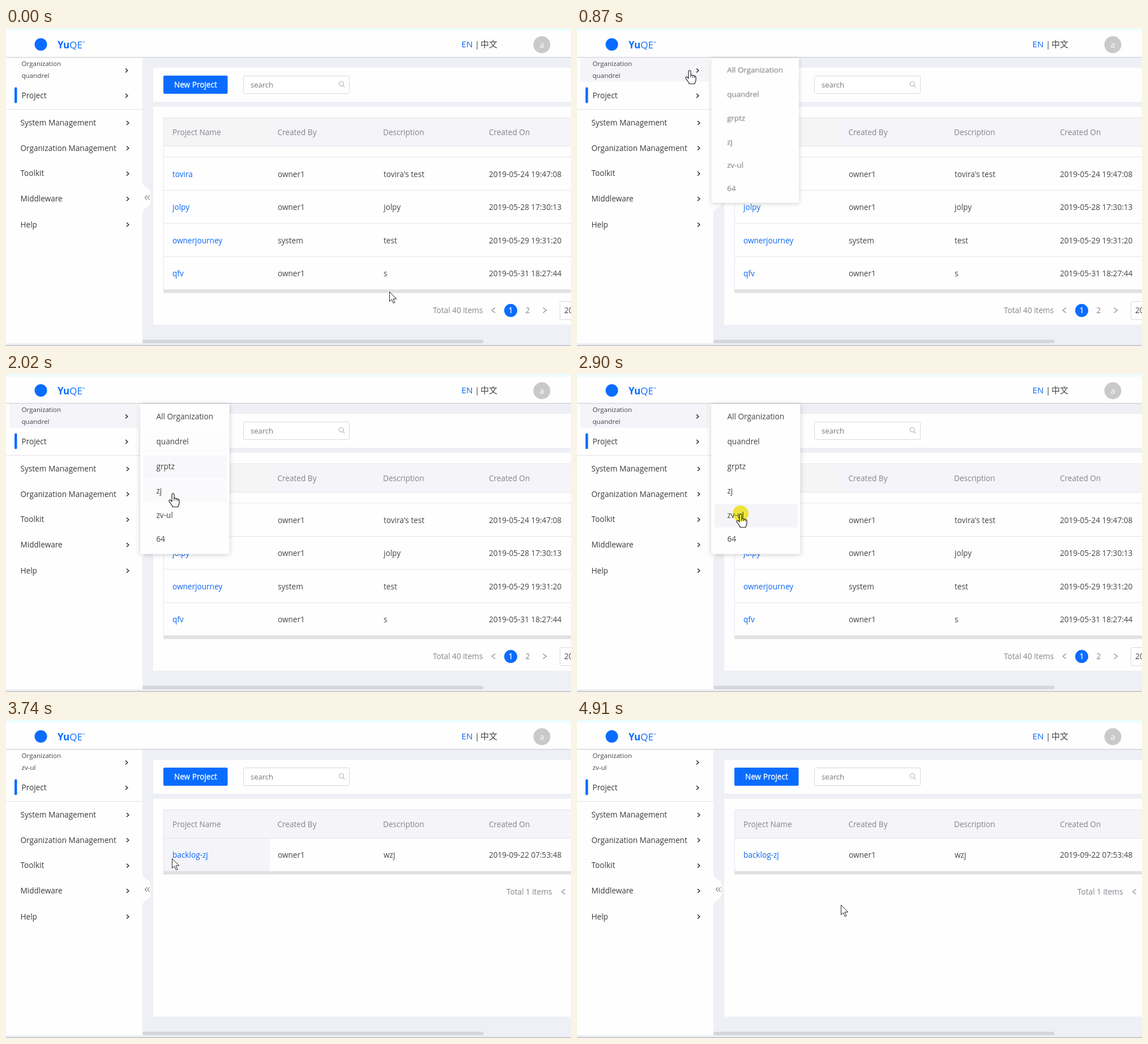
Animation of 998x561 px, one loop 4.98 s. Source, as an HTML page:

```html
<!DOCTYPE html>
<html lang="en">
<head>
<meta charset="utf-8">
<title>Project list</title>
<style>
html, body { margin: 0; width: 100%; height: 100%; overflow: hidden; background: #fefefe; }
svg { display: block; width: 998px; height: 561px; font: 13.6px "Open Sans", "Noto Sans", sans-serif; fill: #444; }
.small { font-size: 11.6px; }
.head { fill: #83838c; }
.link { fill: #0a66f5; }
.blue { fill: #0a6cff; }
.panel { fill: #fefefe; }
.shade { fill: #f4f4f9; }
.page { fill: #eff0f5; }
.bar { fill: #d5d6da; }
.line { fill: none; stroke: #e5e5ea; }
.icon { fill: none; stroke: #8a8a92; stroke-width: 1.2; }
.faint { stroke: #b0b0b6; }
.side { fill: none; stroke: #2a2a2a; stroke-width: 1.5; }

/* one loop for every part */
.anim { animation: 4980ms linear infinite; }
.before { animation-name: before; animation-timing-function: step-end; }
.loading { animation-name: loading; animation-timing-function: step-end; opacity: 0; }
.after { animation-name: after; animation-timing-function: step-end; opacity: 0; }
.loaded { animation-name: loaded; animation-timing-function: step-end; opacity: 0; }
.pointing { animation-name: pointing; animation-timing-function: step-end; opacity: 0; }
.idle { animation-name: idle; animation-timing-function: step-end; }
.click { animation-name: click; animation-timing-function: step-end; opacity: 0; mix-blend-mode: multiply; }
.cursor { animation-name: move; }
.menu { animation-name: menu; animation-timing-function: step-end; opacity: 0;
  transform-origin: 237px 53px; filter: drop-shadow(0 1px 4px rgba(0,0,0,.2)); }
.items { animation-name: items; animation-timing-function: step-end; }
.pass { animation-name: pass; opacity: 0; }
.stay { animation-name: stay; opacity: 0; }
.cell { animation-name: cell; }
.row { animation-name: row; }
.spin { animation-name: spin; transform-origin: 743px 347.5px; }

@keyframes before { 0% { opacity: 1 } 64.257%, 100% { opacity: 0 } }
@keyframes loading { 0% { opacity: 0 } 64.257% { opacity: 1 } 70.683%, 100% { opacity: 0 } }
@keyframes after { 0% { opacity: 0 } 64.257%, 100% { opacity: 1 } }
@keyframes loaded { 0% { opacity: 0 } 70.683%, 100% { opacity: 1 } }
@keyframes pointing { 0% { opacity: 0 } 12.65% { opacity: 1 } 64.257%, 100% { opacity: 0 } }
@keyframes idle { 0% { opacity: 1 } 12.65% { opacity: 0 } 64.257%, 100% { opacity: 1 } }
@keyframes click { 0% { opacity: 0 } 58.23% { opacity: 1 } 61.044%, 100% { opacity: 0 } }
@keyframes menu {
  0% { opacity: 0; transform: scale(.9, .8) }
  14.25% { opacity: .4; transform: scale(.9, .8) }
  15.86% { opacity: .9; transform: scale(.95, .92) }
  17.46% { opacity: 1; transform: scale(.985, .966) }
  19.07% { opacity: 1; transform: scale(.995, .99) }
  20.48% { opacity: 1; transform: none }
  62.65% { opacity: .5; transform: scale(.95, .9) }
  64.257%, 100% { opacity: 0; transform: scale(.9, .8) }
}
@keyframes items { 0% { opacity: .4 } 17.46% { opacity: .75 } 19.07% { opacity: .9 } 20.48%, 100% { opacity: 1 } }
@keyframes pass { 0% { opacity: 0 } 3% { opacity: .8 } 8%, 100% { opacity: 0 } }
@keyframes stay { 0%, 43.5% { opacity: 0 } 46.9%, 100% { opacity: 1 } }
@keyframes cell { 0%, 82.1% { opacity: 1 } 84.9%, 100% { opacity: 0 } }
@keyframes row { 0%, 75.2% { opacity: 0 } 78.3%, 82.1% { opacity: 1 } 84.9%, 100% { opacity: 0 } }
@keyframes spin {
  0%, 64.257% { transform: rotate(-44deg); animation-timing-function: steps(4) }
  70.683%, 100% { transform: rotate(52deg) }
}
@keyframes move {
  0%, 1.606% { transform: translate(677px, 465px); animation-timing-function: steps(2, start) }
  4.82% { transform: translate(605px, 411px); animation-timing-function: steps(3, start) }
  9.44% { transform: translate(305px, 184px); animation-timing-function: steps(2, start) }
  12.651% { transform: translate(239px, 134px); animation-timing-function: steps(2, start) }
  15.863%, 26.908% { transform: translate(199px, 75px); animation-timing-function: steps(3, start) }
  31.526% { transform: translate(262px, 84px); animation-timing-function: steps(4, start) }
  37.751% { transform: translate(314px, 164px); animation-timing-function: steps(3, start) }
  41.867% { transform: translate(295px, 211px); animation-timing-function: steps(4, start) }
  48.594%, 64.25% { transform: translate(289px, 247px); animation-timing-function: step-start }
  64.257%, 75.1% { transform: translate(290px, 246px); animation-timing-function: step-start }
  76.707% { transform: translate(293px, 244px); animation-timing-function: steps(6, start) }
  86.145% { transform: translate(415px, 287px); animation-timing-function: steps(3, start) }
  90.964%, 98.594% { transform: translate(431px, 311px); animation-timing-function: step-start }
  100% { transform: translate(466px, 326px) }
}
</style>
</head>
<body>
<svg viewBox="0 0 998 561">
  <defs>
    <path id="chev" d="M-2-3.5 1.8 0-2 3.5"/>
    <path id="next" d="M-3-4.5 3 0-3 4.5"/>
    <linearGradient id="fall" x2="0" y2="1">
      <stop stop-color="#cdced2"/><stop offset="1" stop-color="#cdced2" stop-opacity="0"/>
    </linearGradient>
  </defs>

  <!-- page -->
  <rect class="panel" width="998" height="561"/>
  <rect class="page" x="241" y="51" width="757" height="506"/>
  <rect class="panel" x="260" y="70" width="738" height="60"/>
  <rect class="panel" x="260" y="139" width="738" height="384.5"/>
  <rect class="page" y="556" width="998" height="5"/>
  <rect class="bar" x="241" y="550" width="602" height="6" rx="2"/>
  <rect y="559.5" width="998" height="1.5" fill="#c0c1c6"/>

  <!-- toolbar -->
  <rect class="blue" x="278" y="84" width="113.5" height="32" rx="2"/>
  <text x="297" y="105" fill="#fff" stroke="#fff" stroke-width=".3">New Project</text>
  <rect x="419.5" y="84.5" width="187" height="31" rx="2" fill="#fff" stroke="#d9d9de"/>
  <text x="432" y="105" fill="#777" font-size="13">search</text>
  <path class="icon faint" d="M595.5 102l2.5 2.5M596.2 98.4a3.9 3.9 0 1 1-7.8 0a3.9 3.9 0 1 1 7.8 0"/>

  <!-- table shown at first -->
  <g class="anim before">
    <rect class="shade" x="279" y="158" width="719" height="50"/>
    <rect x="279" y="159" width="185" height="49" fill="#f5f5f6"/>
    <path class="line" d="M998 158.5H278.5V462M279 208.5H998M279 227.5H998M279 286.5H998M279 344.5H998M279 403.5H998M279 461.5H998"/>
    <rect x="278" y="462" width="720" height="5.5" fill="#e1e1e3"/>
    <text class="head" y="189"><tspan x="294">Project Name</tspan><tspan x="479.5">Created By</tspan><tspan x="666">Description</tspan><tspan x="853">Created On</tspan></text>
    <text y="263"><tspan class="link" x="294">tovira</tspan><tspan x="480">owner1</tspan><tspan x="667">tovira's test</tspan><tspan x="853">2019-05-24 19:47:08</tspan></text>
    <text y="321"><tspan class="link" x="294">jolpy</tspan><tspan x="480">owner1</tspan><tspan x="667">jolpy</tspan><tspan x="853">2019-05-28 17:30:13</tspan></text>
    <text y="380"><tspan class="link" x="294">ownerjourney</tspan><tspan x="480">system</tspan><tspan x="667">test</tspan><tspan x="853">2019-05-29 19:31:20</tspan></text>
    <text y="438"><tspan class="link" x="294">qfv</tspan><tspan x="480">owner1</tspan><tspan x="667">s</tspan><tspan x="853">2019-05-31 18:27:44</tspan></text>
    <text class="head" x="754" y="503">Total 40 items</text>
    <circle class="blue" cx="891.5" cy="498.3" r="11.5"/>
    <text x="891.5" y="502.5" fill="#fff" stroke="#fff" stroke-width=".3" text-anchor="middle">1</text>
    <text class="head" x="921.5" y="502.5" text-anchor="middle">2</text>
    <use class="icon" href="#next" transform="translate(861 498) scale(-1 1)"/>
    <use class="icon" href="#next" x="951.5" y="498"/>
    <rect x="978.5" y="482.5" width="60" height="32" rx="2" fill="#fff" stroke="#d9d9de"/>
    <text x="986" y="503">20</text>
  </g>

  <!-- loading -->
  <g class="anim loading">
    <rect class="page" x="260" y="518" width="738" height="14"/>
    <rect x="278" y="518" width="720" height="8" fill="#f3f4f7"/>
    <rect class="bar" x="260" y="526" width="748" height="5.5" rx="2"/>
    <g class="anim spin" fill="#b4d9ff">
      <circle cx="738.2" cy="342.7" r="3.6"/><circle cx="747.8" cy="342.7" r="3.6" fill="#93c9ff"/>
      <circle cx="747.8" cy="352.3" r="3.6"/><circle cx="738.2" cy="352.3" r="3.6"/>
    </g>
  </g>

  <!-- table after the switch -->
  <g class="anim loaded">
    <rect class="shade" x="279" y="158" width="719" height="50"/>
    <rect class="shade anim cell" x="279" y="209" width="187" height="58"/>
    <rect class="shade anim row" x="466" y="209" width="532" height="58"/>
    <path class="line" d="M998 158.5H278.5V267M279 208.5H998"/>
    <rect x="278" y="266.5" width="720" height="6" fill="#e1e1e3"/>
    <text class="head" y="189"><tspan x="294">Project Name</tspan><tspan x="479.5">Created By</tspan><tspan x="666">Description</tspan><tspan x="853">Created On</tspan></text>
    <text y="243"><tspan class="link" x="294">backlog-zj</tspan><tspan x="480">owner1</tspan><tspan x="667">wzj</tspan><tspan x="853">2019-09-22 07:53:48</tspan></text>
    <text class="head" x="884" y="308">Total 1 items</text>
    <use class="icon" href="#next" transform="translate(984.5 303) scale(-1 1)"/>
  </g>

  <!-- sidebar -->
  <path class="panel" d="M240 270Q242 278 248 281Q255 284 255 290V309Q255 314 248 317Q242 320 240 328Z"/>
  <path class="icon" d="M249 295l-3.5 4 3.5 4M253.5 295l-3.5 4 3.5 4"/>
  <rect class="shade anim pointing" x="6" y="53" width="227" height="41.5"/>
  <text class="small" x="27.5" y="67">Organization</text>
  <text class="small anim before" x="27.5" y="87.5">quandrel</text>
  <text class="small anim after" x="27.5" y="87.5">zv-ul</text>
  <rect class="blue" x="15" y="104.5" width="4.5" height="28" rx="2.2"/>
  <path class="line" d="M0 143.5H241"/>
  <g fill="#3a3a3a">
    <text x="27.5" y="124">Project</text>
    <text x="25.5" y="172">System Management</text>
    <text x="25.5" y="217">Organization Management</text>
    <text x="25.5" y="261">Toolkit</text>
    <text x="25.5" y="306">Middleware</text>
    <text x="25.5" y="351.5">Help</text>
  </g>
  <g class="side">
    <use href="#chev" x="213" y="75"/><use href="#chev" x="213" y="119.5"/>
    <use href="#chev" x="215" y="167.5"/><use href="#chev" x="215" y="212"/>
    <use href="#chev" x="215" y="257"/><use href="#chev" x="215" y="301.5"/>
    <use href="#chev" x="215" y="347"/>
  </g>

  <!-- header -->
  <rect class="panel" width="998" height="51"/>
  <rect width="998" height="5" fill="#eefdfd"/>
  <rect y="51" width="998" height="2.5" fill="url(#fall)"/>
  <circle class="blue" cx="61.5" cy="29" r="11"/>
  <text class="blue" x="91" y="36" font-size="17"><tspan font-weight="700">Yu</tspan>QE<tspan font-size="6" dy="-8">™</tspan></text>
  <text x="804.5" y="33.5" font-size="15.2"><tspan class="link">EN</tspan><tspan x="828">|</tspan></text>
  <text x="838" y="33.5" style="font:15px 'Noto Sans CJK SC','Noto Sans CJK',sans-serif">中文</text>
  <circle cx="946.5" cy="29.5" r="15" fill="#c9c9c9"/>
  <text x="946.5" y="34.5" fill="#fff" text-anchor="middle">a</text>

  <!-- organization menu -->
  <g class="anim menu">
    <rect x="237" y="53" width="157.5" height="264.5" fill="#fefefe"/>
    <g class="shade">
      <rect class="anim pass" style="animation-delay:-3500ms" x="243" y="55" width="146.5" height="41.5"/>
      <rect class="anim pass" style="animation-delay:-3350ms" x="243" y="99" width="146.5" height="41.5"/>
      <rect class="anim pass" style="animation-delay:-3200ms" x="243" y="143" width="146.5" height="41.5"/>
      <rect class="anim pass" style="animation-delay:-3020ms" x="243" y="186" width="146.5" height="41.5"/>
      <rect class="anim stay" x="243" y="229" width="146.5" height="41.5"/>
    </g>
    <g class="anim items">
      <text x="265.5" y="80">All Organization</text>
      <text x="265.5" y="124">quandrel</text>
      <text x="265.5" y="168">grptz</text>
      <text x="265.5" y="211">zj</text>
      <text x="265.5" y="253.5">zv-ul</text>
      <text x="265.5" y="296">64</text>
    </g>
  </g>

  <!-- pointer -->
  <g class="anim cursor" fill="#fff" stroke="#222" stroke-linejoin="round">
    <path class="anim idle" d="M.5.5V17.6L4.4 13.9 7.3 20.5 9.9 19.4 7 12.9H12.7Z"/>
    <g class="anim pointing">
      <path stroke-width="1.2" d="M-2 14V1.8A2 2 0 0 1 2 1.8V8.3Q4.4 7 5.5 9Q7.7 8 8.6 9.9Q11 9.6 11 12V16.5Q11 19.5 9 22V23.5H-1V22L-6.5 14.3Q-8 12-6 11.2Q-4.6 10.8-2 14Z"/>
      <path fill="none" d="M2 8V12.5M5.5 9V12.7M8.6 10V13"/>
    </g>
  </g>
  <circle class="anim click" cx="289" cy="246" r="14" fill="#f6f03c"/>
</svg>
</body>
</html>
```
